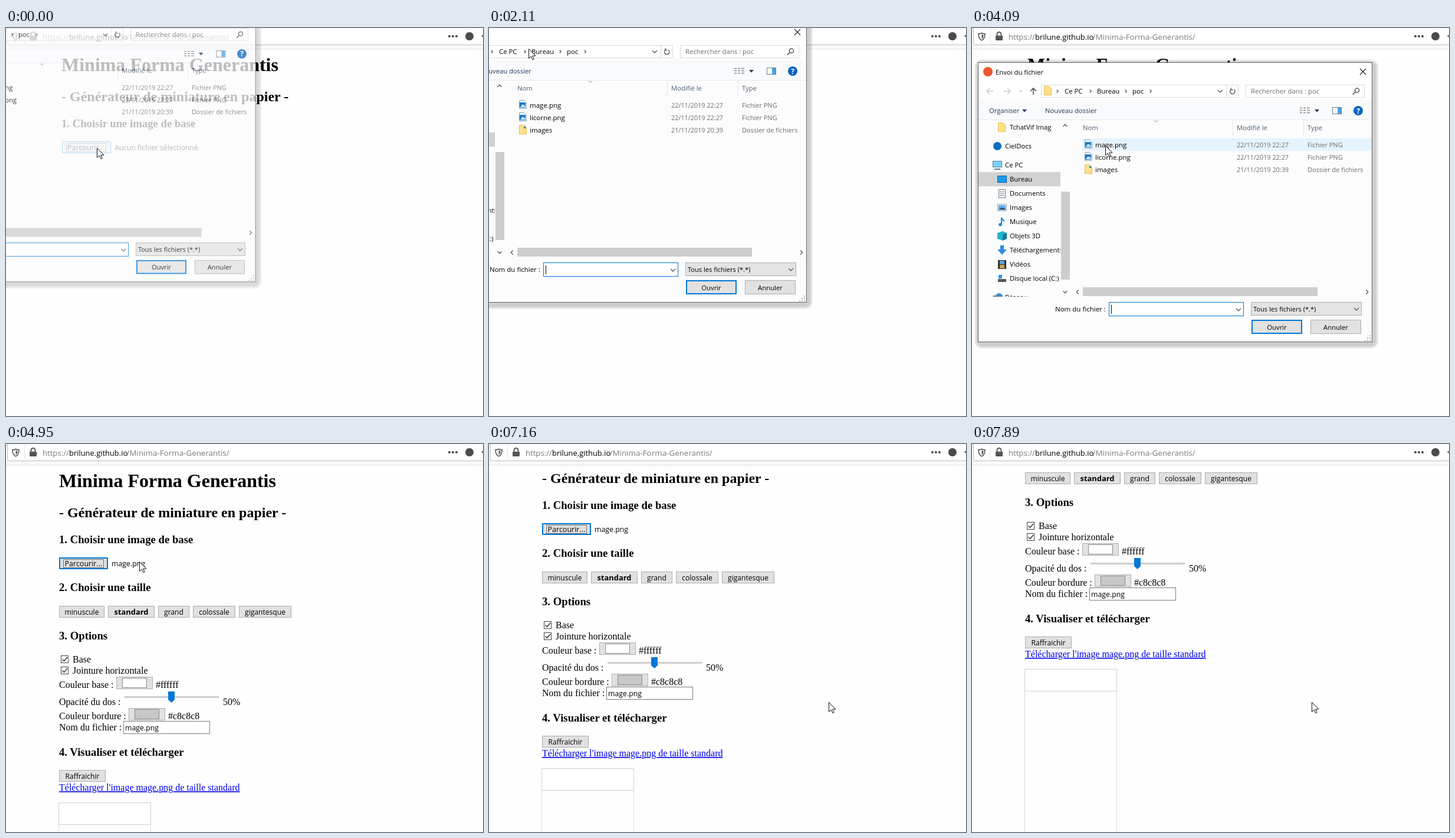
These frames come from a looping animation (809 by 657 pixels, 8000 ms). An HTML page:

```html
<!DOCTYPE html>
<html lang="fr">
<head>
<meta charset="utf-8">
<title>Minima Forma Generantis</title>
<style>
  html, body { margin: 0; width: 100%; height: 100%; overflow: hidden; background: #fff; }
  svg { display: block; width: 809px; height: 657px; }
  text { font-family: "Open Sans", "Noto Sans", sans-serif; white-space: pre; }
  .serif { font-family: "Liberation Serif", "Noto Serif", serif; }
  .line { fill: none; }
</style>
</head>
<body>
<svg id="stage" viewBox="0 0 809 657" xmlns="http://www.w3.org/2000/svg"></svg>
<script>
const LOOP = 8000;
const BLUE = '#0078d7';

// Markup helpers
const text = (x, y, s, size = 11.3, fill = '#000', extra = '') =>
  `<text x="${x}" y="${y}" font-size="${size}" fill="${fill}" ${extra}>${s}</text>`;
const serif = (x, y, s, size = 16, extra = '') => text(x, y, s, size, '#000', `class="serif" ${extra}`);
const heading = (y, s, size = 18.72) => serif(90, y, s, size, 'font-weight="700"');
const fill = (x, y, w, h, color, extra = '') =>
  `<rect x="${x}" y="${y}" width="${w}" height="${h}" fill="${color}" ${extra}/>`;
const box = (x, y, w, h, color, stroke, sw = 1) =>
  fill(x + sw / 2, y + sw / 2, w - sw, h - sw, color, `stroke="${stroke}" stroke-width="${sw}"`);
const line = (d, color = '#555', w = 1, extra = '') =>
  `<path class="line" d="${d}" stroke="${color}" stroke-width="${w}" ${extra}/>`;
const shape = (d, color) => `<path d="${d}" fill="${color}"/>`;
const dot = (x, y, r, color) => `<circle cx="${x}" cy="${y}" r="${r}" fill="${color}"/>`;
const group = (id, body) => `<g id="${id}">${body}</g>`;
const chevron = (x, y, dir, r = 3.5, color = '#555', w = 1.3) => {
  const h = r / 2;
  const d = {
    down: `M${x - r} ${y - h}l${r} ${r} ${r} ${-r}`,
    up: `M${x - r} ${y + h}l${r} ${-r} ${r} ${r}`,
    right: `M${x - h} ${y - r}l${r} ${r} ${-r} ${r}`,
    left: `M${x + h} ${y - r}l${-r} ${r} ${r} ${r}`
  }[dir];
  return line(d, color, w);
};
const button = (x, y, w, h, label, { size = 12.1, stroke = '#adadad', sw = 1, extra = '' } = {}) =>
  box(x, y, w, h, '#e1e1e1', stroke, sw) +
  text(x + w / 2, y + h / 2 + 4.8, label, size, '#000', `text-anchor="middle" ${extra}`);

// Browser bar
function browserBar() {
  return fill(0, 0, 809, 35, '#f9f9fa') + fill(3, 0, 806, 28, '#fff') +
    line('M2.5 0V26.5q0 2 2 2H809', '#bdbdbd') + line('M0 35.5H809', '#e3e3e3') +
    line('M31.5 2V26', '#dedede') +
    line('M16.5 8.5q3 1.6 5.5 1.4 0 8.2-5.5 11-5.5-2.8-5.5-11 2.5.2 5.5-1.4z', '#555', 1.6) +
    shape('M16.5 11v7.5q3-2.5 3-6.5z', '#555') +
    fill(40, 13, 12, 8, '#555', 'rx="1.3"') + line('M42.5 13v-2.5a3.5 3.5 0 0 1 7 0V13', '#555', 2) +
    text(62, 20, 'https://', 13.15, '#7a7a7a') + text(107, 20, 'brilune.github.io', 12.9) +
    text(204.5, 20, '/Minima-Forma-Generantis/', 13.4, '#7a7a7a') +
    [752, 758, 764].map(x => dot(x, 14, 2.1, '#4a4a4f')).join('') +
    dot(786, 14, 7, '#4a4a4f') + shape('M805.5 12.5h4v4z', '#4a4a4f');
}

// Page content
function colorField(x, y, color) {
  return box(x, y, 62, 21, '#e1e1e1', '#adadad') + box(x + 10, y + 2, 42, 17, color, '#8a8a8a');
}

function checkbox(y, label) {
  return box(93, y - 6, 13, 13, '#fff', '#444') + line(`M95.5 ${y + .5}l3 3 5.5-6.5`, '#222', 1.3) +
    serif(113, y + 6, label);
}

function pageTop() {
  return heading(73, 'Minima Forma Generantis', 32) +
    heading(124, '- Générateur de miniature en papier -', 24) +
    heading(168, '1. Choisir une image de base');
}

function emptyPicker() {
  return box(91, 192, 83, 20, '#e5f1fb', BLUE) +
    text(132, 207, 'Parcourir...', 12.5, '#000', 'text-anchor="middle"') +
    line('M98.5 195.5h67v14h-67z', '#000', 1, 'stroke-dasharray="1 1"') +
    text(180, 207, 'Aucun fichier sélectionné.', 12.1);
}

function form() {
  const sizes = [['minuscule', 90, 77], ['standard', 173, 79], ['grand', 258, 53],
                 ['colossale', 317, 72], ['gigantesque', 395, 89]];
  return button(90, 192, 83, 20, 'Parcourir...', { size: 12.5, stroke: BLUE, sw: 2 }) +
    line('M97.5 195.5h68v14h-68z', '#000', 1, 'stroke-dasharray="1 1"') +
    text(179, 207, 'mage.png', 12.3) +
    heading(249, '2. Choisir une taille') +
    sizes.map(([label, x, w]) => button(x, 274, w, 20, label,
      label === 'standard' ? { size: 12.9, extra: 'font-weight="700"' } : {})).join('') +
    heading(331, '3. Options') +
    checkbox(364, 'Base') + checkbox(383, 'Jointure horizontale') +
    serif(90, 413, 'Couleur base :') + colorField(187, 394, '#fff') + serif(254, 413, '#ffffff') +
    serif(90, 442, 'Opacité du dos :') + fill(201, 427, 160, 3, '#cdcdcd') +
    shape('M275 419h11v14l-5.5 5-5.5-5z', BLUE) + serif(368, 442, '50%') +
    serif(90, 466, 'Couleur bordure :') + colorField(208, 447, '#c8c8c8') + serif(275, 466, '#c8c8c8') +
    serif(90, 485, 'Nom du fichier :') + box(199, 469, 147, 22, '#fff', '#7a7a7a') +
    text(202, 485, 'mage.png', 12.3) +
    heading(528, '4. Visualiser et télécharger') +
    button(90, 552, 79, 20, 'Raffraichir') +
    text(90, 587, "Télécharger l'image mage.png de taille standard", 16, '#0000ee',
      'class="serif" text-decoration="underline"') +
    line('M89.5 645V1200M245.5 645V1200', '#dcdcdc') + box(89, 607, 157, 38, '#fff', '#cfcfcf');
}

// File dialog
const folder = (x, y) => shape(`M${x} ${y}h8l5 4v12h-13z`, '#ffe08a') +
  line(`M${x + .5} ${y + .5}h7l5 4v11h-12z`, '#e6bd55');
const picture = (x, y) => shape(`M${x} ${y}h9l4 4v11h-13z`, '#fff') +
  line(`M${x + .5} ${y + .5}h8.5l3.5 3.5v10.5h-12z`, '#8aa0b5') + fill(x + 1, y + 4, 10, 9, '#1979ca') +
  shape(`M${x + 2} ${y + 12}l4-5 2 2 1-1 2 4z`, '#cfe6f8');

function shadow() {
  return [0, 2, 4].map(i =>
    fill(4 + i, 53 + i, 685 - 2 * i, 490 - 2 * i, '#000', `rx="${13 - i}" opacity=".065"`)).join('');
}

function sidebar() {
  const items = [
    [64, 168, 'TchatVif Imag', folder(44, 160)],
    [56, 200, 'CielDocs', dot(43, 200, 7, '#0f6cbd')],
    [56, 232, 'Ce PC', box(35, 225, 16, 11, '#7fd0f5', '#4b7fa3') + fill(38, 238, 10, 2, '#5d7f97')],
    [64, 256, 'Bureau', box(43, 250, 16, 12, '#1a9bf0', '#0b5ea8')],
    [64, 280, 'Documents', box(45, 273, 12, 15, '#fff', '#777') +
      line('M47 277.5h8M47 280.5h8M47 283.5h8', '#6b8fb0')],
    [64, 304, 'Images', box(43, 298, 16, 12, '#fff', '#8a9aa8') + fill(45, 300, 12, 8, '#5db0e8') +
      shape('M45 308l5-4 7 2v2z', '#35566f')],
    [64, 328, 'Musique', line('M50 333v-12q1 4 5 6', '#1a86d9', 2) + dot(48, 333, 2.8, '#1a86d9')],
    [64, 352, 'Objets 3D', shape('M43 347l9-3 7 3v10l-7 3-9-3z', '#27b3c9') +
      shape('M52 350l7-3v10l-7 3z', '#147a94')],
    [64, 376, 'Téléchargements', shape('M48 368h6v7h5l-8 9-8-9h5z', '#2f8be0')],
    [64, 400, 'Vidéos', fill(44, 393, 14, 15, '#333') + fill(47, 394, 8, 6, '#5aa0df') +
      fill(47, 401, 8, 6, '#c9a64d')],
    [64, 424, 'Disque local (C:)', fill(44, 425, 14, 5, '#555') + fill(45, 418, 6, 6, '#1a9bf0')],
    [56, 456, 'Réseau', dot(46, 455, 6, '#3a8fd0') + fill(36, 453, 12, 8, '#57799a')]
  ];
  return fill(11, 244, 139, 24, '#d2d2d2') +
    items.map(([x, y, label, icon]) => icon + text(x, y + 4, label)).join('');
}

function fileRow(y, name, date, type, icon) {
  return icon + text(209, y + 4, name, 11.5) +
    text(449, y + 4, date, 10.85, '#6d6d6d') + text(569, y + 4, type, 11, '#6d6d6d');
}

function dialog() {
  const grip = [[675, 521], [675, 525], [675, 529], [671, 525], [671, 529], [667, 529]];
  return shadow() +
    box(10, 58, 669, 474, '#fcfcfc', '#646464') + fill(11, 59, 667, 60, '#fff') +
    dot(27, 74, 8, '#f0562b') + text(40, 79, 'Envoi du fichier') +
    line('M658 69l10 10M668 69l-10 10', '#222', 1.2) +
    // navigation row
    line('M36 107H25M30 102l-5 5 5 5M54 107h11M60 102l5 5-5 5', '#c4c4c4', 1.3) +
    chevron(83, 107, 'down', 2, '#c0c0c0') + line('M104 113v-11M99 107l5-5 5 5', '#555', 1.6) +
    box(117, 96, 335, 22, '#fff', '#d9d9d9') + line('M431.5 97V117', '#d9d9d9') + folder(122, 98) +
    text(157, 111, 'Ce PC') + text(212, 111, 'Bureau') + text(272, 111, 'poc') +
    [145, 201, 261, 303].map(x => chevron(x, 107, 'right', 2.5)).join('') +
    chevron(421, 107, 'down', 4) +
    line('M439 104a4.3 4.3 0 1 0 5.5 0M439 101v3.5h3.5', '#555', 1.3) +
    box(464, 96, 202, 22, '#fff', '#d9d9d9') + text(473, 111, 'Rechercher dans : poc', 11.3, '#6d6d6d') +
    line('M650 108.5l-4 4', '#444', 1.6) +
    '<circle class="line" cx="653" cy="105.5" r="3.6" stroke="#444" stroke-width="1.3"/>' +
    // toolbar
    fill(11, 122, 667, 33, '#f9fafc') + line('M11 155.5H678', '#e6e8ec') +
    text(29, 144, 'Organiser', 11.2, '#1e395b') + shape('M85 138h8l-4 4.5z', '#1e395b') +
    group('newFolder', box(109, 127, 118, 26, '#d9e9f4', '#7ab8e0')) +
    text(124, 144, 'Nouveau dossier', 11.2, '#1e395b') +
    [135, 139, 143].map(y => line(`M556 ${y + .5}h4M562 ${y + .5}h4M568 ${y + .5}h5`, '#888', 1.5)).join('') +
    shape('M581 138h8l-4 4.5z', '#1e395b') +
    box(611, 134, 16, 12, '#fff', '#6b7c8c') + fill(620, 135, 6, 10, '#4ba3e0') +
    dot(655, 140, 8, '#0b64c0') + text(655, 144.5, '?', 12, '#fff', 'font-weight="700" text-anchor="middle"') +
    // side panel
    `<g clip-path="url(#side)">${sidebar()}</g>` +
    chevron(158, 165, 'up') + fill(151, 277, 15, 149, '#cdcdcd') + chevron(158, 447, 'down') +
    // file list
    group('header', fill(171, 156, 271, 26, '#d9ebf9')) +
    group('row', fill(187, 0, 491, 21, '#e5f3ff')) +
    chevron(312, 158, 'down', 3, '#888', 1) +
    text(188, 173, 'Nom', 11.3, '#4c607a') + text(449, 173, 'Modifié le', 11.3, '#4c607a') +
    text(569, 173, 'Type', 11.3, '#4c607a') + line('M442.5 156v26M562.5 156v26', '#e5e5e5') +
    fileRow(198, 'mage.png', '22/11/2019 22:27', 'Fichier PNG', picture(191, 189)) +
    fileRow(219, 'licorne.png', '22/11/2019 22:27', 'Fichier PNG', picture(191, 210)) +
    fileRow(240, 'images', '21/11/2019 20:39', 'Dossier de fichiers',
      folder(191, 231) + fill(199, 234, 3, 3, '#2f7fc0')) +
    chevron(179, 447, 'left') + fill(188, 439, 398, 15, '#cdcdcd') + chevron(670, 447, 'right') +
    // footer
    text(141, 480, 'Nom du fichier :', 11.5) + box(232, 464, 229, 24, '#fff', BLUE) +
    chevron(452, 477, 'down', 4) + group('caret', line('M236.5 469V484', '#000')) +
    group('chosen', text(236, 480, 'mage.png', 11.5)) +
    box(473, 464, 188, 23, '#e3e3e3', '#adadad') + text(477, 480, 'Tous les fichiers (*.*)', 11.1) +
    chevron(652, 476, 'down', 4) +
    button(474, 494, 86, 24, 'Ouvrir', { size: 11.3, stroke: BLUE, sw: 2 }) +
    button(574, 494, 86, 24, 'Annuler', { size: 11.3 }) +
    grip.map(([x, y]) => fill(x - 1, y - 1, 2, 2, '#b5b5b5')).join('');
}

document.getElementById('stage').innerHTML =
  '<defs><clipPath id="side"><path d="M11 156H150V455H11z"/></clipPath>' +
  '<clipPath id="view"><path d="M0 36H809V657H0z"/></clipPath></defs>' +
  fill(0, 0, 809, 657, '#fefefe') +
  `<g clip-path="url(#view)">${group('page', pageTop() + group('empty', emptyPicker()) + group('form', form()))}</g>` +
  browserBar() + group('dialog', dialog()) +
  group('tip', box(226, 220, 68, 22, '#fff', '#767676') + text(233, 236, 'mage.png', 11.6)) +
  group('cursor', '<path d="M.5.5V16.5L4.3 13l2.6 5.7 2.3-1-2.5-5.6H12z" fill="#fff" stroke="#111"/>');

const parts = Object.fromEntries(['page', 'empty', 'form', 'dialog', 'newFolder', 'header', 'row',
  'caret', 'chosen', 'tip', 'cursor'].map(id => [id, document.getElementById(id)]));
const show = (part, on) => part.setAttribute('display', on ? 'inline' : 'none');
const move = (part, value) => part.setAttribute('transform', value);

// Each track holds [start, ...values]; the picture is held between starts.
const pick = (track, t) => track.findLast(step => step[0] <= t);
const within = (t, from, to) => t >= from && t < to;

const cursorTrack = [
  [0, 154, 203], [870, 126, 150], [990, 98, 116], [2110, 67, 35], [2230, 120, 60], [2350, 151, 75],
  [2600, 153, 95], [2720, 160, 120], [2840, 166, 141], [2960, 176, 152], [3080, 184, 159],
  [3200, 191, 163], [3320, 195, 166], [3470, 212, 186], [3590, 226, 199], [5690, 227, 207],
  [5810, 300, 280], [5930, 410, 420], [6050, 478, 501], [6420, 540, 460], [6540, 576, 437]
];
const dialogTrack = [
  [0, 'translate(-247.8 -94.2) scale(.989 .986)', .75], [120, 'translate(-251 -98)', 1],
  [2110, 'translate(-140 -67)', 1], [2230, 'translate(-83 -40)', 1], [2350, 'translate(0 0)', 1],
  [4710, 'translate(4.5 3.8) scale(.987)', .4], [4830, 'translate(0 0)', 0]
];
const rowTrack = [[0, 0], [870, 229], [990, 208], [2110, 0], [3470, 187], [4830, 0]];
const scrollTrack = [[0, 0], [7160, 58], [7280, 165], [7400, 220], [7650, 223], [7770, 225], [7890, 226]];

function draw(t) {
  const [, x, y] = pick(cursorTrack, t);
  const [, place, opacity] = pick(dialogTrack, t);
  const [, rowY] = pick(rowTrack, t);
  const [, scroll] = pick(scrollTrack, t);
  const loaded = t >= 4830;

  move(parts.cursor, `translate(${x} ${y})`);
  move(parts.page, `translate(${loaded ? 0 : 4} ${-scroll})`);
  show(parts.empty, !loaded);
  show(parts.form, loaded);

  move(parts.dialog, place);
  parts.dialog.setAttribute('opacity', opacity);
  show(parts.dialog, opacity > 0);
  show(parts.newFolder, within(t, 2720, 2960));
  show(parts.header, within(t, 2960, 3470));
  show(parts.row, rowY > 0);
  move(parts.row, `translate(0 ${rowY})`);
  show(parts.caret, within(t, 2110, 2600) || within(t, 3080, 3590) || within(t, 4090, 4590));
  show(parts.chosen, t >= 4590);
  show(parts.tip, within(t, 5440, 5810));
}

let start;
function tick(now) {
  start ??= now;
  draw((now - start) % LOOP);
  requestAnimationFrame(tick);
}
draw(0);
requestAnimationFrame(tick);
</script>
</body>
</html>
```
